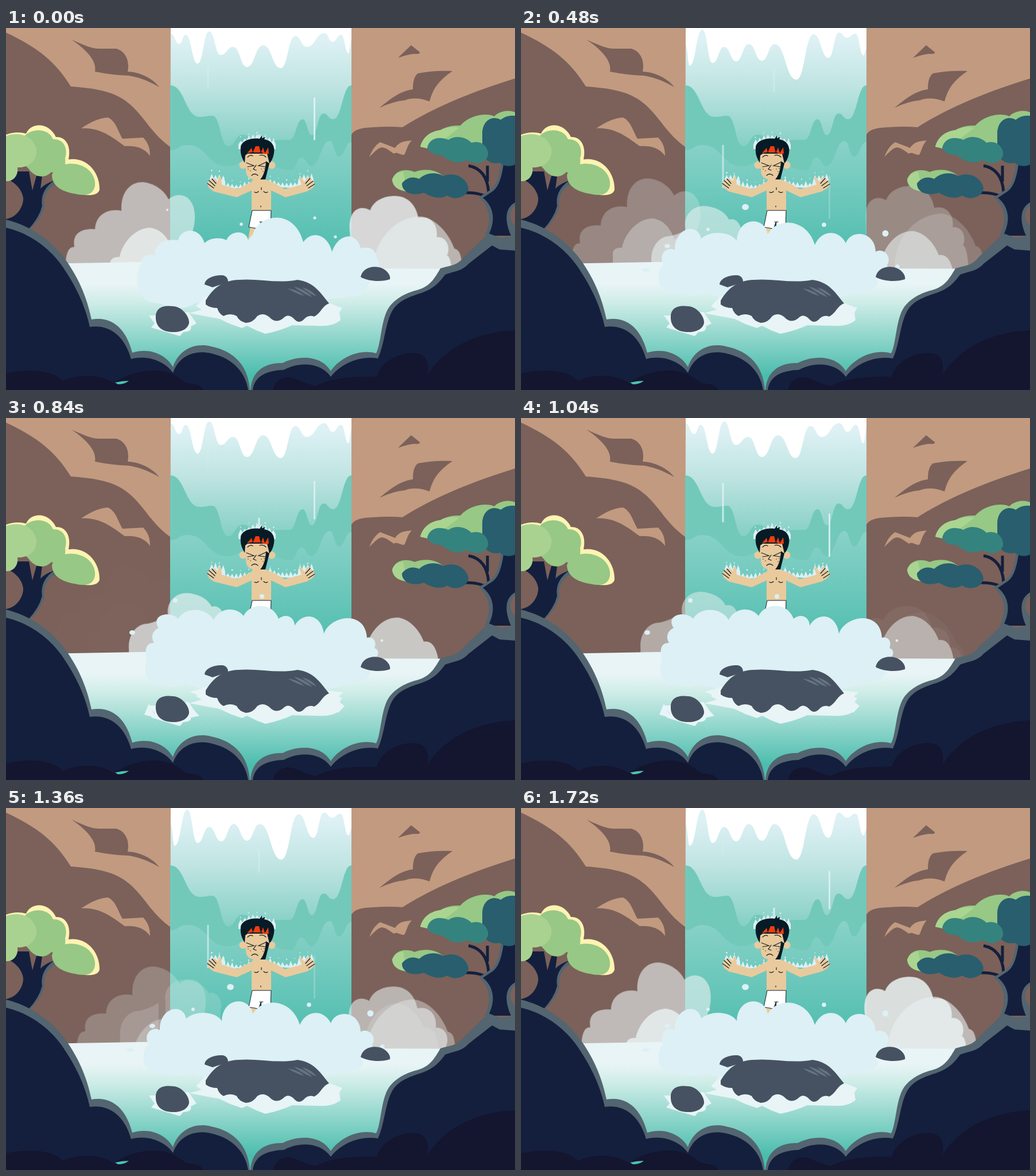
These frames come from a looping animation (887x631 px, 1.76 s). An HTML page:

```html
<!DOCTYPE html>
<html lang="en">
<head>
<meta charset="utf-8">
<title>Waterfall training</title>
<style>
html, body { margin: 0; width: 100%; height: 100%; overflow: hidden; background: #7b6159; }
svg { display: block; width: 100vw; height: 100vh; }
.light { fill: #c19a80 } .dark { fill: #7b6159 }
.navy { fill: #141f3d } .edge { fill: #536570 } .night { fill: #14152f }
.stone { fill: #465261 } .skin { fill: #e9ca9d } .hair { fill: #061b26 }
.foam { fill: #dcf0f5 } .pale { fill: #e8f4f6 }
.line { fill: none; stroke: #10202a; stroke-width: 1.2; stroke-linecap: round }
.branch { fill: none; stroke: #141f3d; stroke-width: 5 }

/* Three foam poses, held without tweening. */
.a, .b, .c { animation: 1760ms step-end infinite }
.a { animation-name: a } .b { animation-name: b } .c { animation-name: c }
@keyframes a { 0% { opacity: 1 } 4.545%, to { opacity: 0 } }
@keyframes b { 0% { opacity: 0 } 4.545% { opacity: 1 } 36.36% { opacity: 0 } 68.18%, to { opacity: 1 } }
@keyframes c { 0% { opacity: 0 } 36.36% { opacity: 1 } 68.18%, to { opacity: 0 } }

/* Every puff swells, drifts by (dx, dy) and thins out, at its own phase. */
.puff { fill: #e8f0f0; animation: drift 1760ms var(--delay) linear infinite }
@keyframes drift {
  0% { opacity: 0; transform: translate(calc(-1 * var(--dx)), calc(-1 * var(--dy))) }
  35% { opacity: var(--peak); transform: none }
  85%, to { opacity: 0; transform: translate(var(--dx), var(--dy)) }
}
.left { --delay: -640ms } .right { --delay: -760ms } .late { --delay: -1700ms }

.streak { fill: #e6f5f7; width: 3px; animation: fall 880ms var(--delay) linear infinite }
@keyframes fall {
  0% { y: 40px; height: 20px; opacity: 0 }
  33% { y: 122.5px; height: 75px; opacity: .85 }
  55% { opacity: .8 }
  to { y: 290px; height: 75px; opacity: 0 }
}
</style>
</head>
<body>
<svg viewBox="0 0 887 631" preserveAspectRatio="none">
<defs>
  <linearGradient id="fall" gradientUnits="userSpaceOnUse" x1="0" y1="20" x2="0" y2="240">
    <stop stop-color="#def1f5"/><stop offset=".37" stop-color="#bfe4e2"/><stop offset="1" stop-color="#72c9bb"/>
  </linearGradient>
  <linearGradient id="deep" gradientUnits="userSpaceOnUse" x1="0" y1="195" x2="0" y2="370">
    <stop stop-color="#8ad2c8"/><stop offset="1" stop-color="#57c0b2"/>
  </linearGradient>
  <linearGradient id="pool" gradientUnits="userSpaceOnUse" x1="0" y1="408" x2="0" y2="605">
    <stop offset=".2" stop-color="#e8f4f6"/><stop offset=".35" stop-color="#d0ede8"/><stop offset="1" stop-color="#4bbdad"/>
  </linearGradient>
</defs>

<!-- cliffs -->
<path class="light" d="M0 0H887V420H0z"/>
<path class="dark" d="M0 8C55 34 86 58 113 102C155 105 182 110 204 124C240 148 248 180 287 208V420H0zM601 188C606 176 620 174 640 173Q670 171 691 173C740 142 800 115 887 88V430H601z"/>
<path class="dark" d="M114 20C140 32 150 36 163 36H192C208 40 216 57 212 76C235 77 255 88 267 103C248 92 232 86 214 83Q184 82 155 76C158 60 146 42 114 20zM683 52L706 30L721 42Q722 46 712 45Q700 46 683 52zM651 139C668 125 688 109 709 107C709 92 712 83 718 79C738 75 757 74 778 75C757 90 745 102 738 128C722 122 708 121 695 126Q674 128 651 139z"/>
<path class="light" d="M131 175C150 162 164 157 178 156C192 163 195 180 203 193L239 191C248 200 251 210 251 223C240 208 225 205 207 206C190 194 165 172 131 175zM633 225C640 208 646 203 652 199L678 209C685 198 695 197 707 196C699 204 698 215 694 221C687 222 682 215 676 219C672 217 664 209 655 208C648 209 642 216 633 225z"/>

<!-- waterfall -->
<path d="M287 0H602V420H286z" fill="url(#fall)"/>
<path fill="#72c9ba" data-wave="286 100 338 155 360 153 387 206 412 186 440 196 494 195 517 159 533 187 553 149 570 159 602 100" data-end="V420H286z"/>
<path fill="url(#deep)" data-wave="286 213 316 204 385 241 430 228 497 248 515 226 532 241 564 197 580 224 602 199" data-end="V420H286z"/>
<g fill="#fff">
  <path class="b" data-wave="287 30 294 66 316 3 334 61 354 33 375 58 397 28 420 57 442 28 480 90 510 11 536 52 554 8 568 17 583 10 597 48 602 36" data-end="V0H287z"/>
  <g class="a"><use href="#drips"/></g>
  <g class="c"><path id="drips" data-wave="287 10 302 28 313 12 334 62 354 6 374 47 396 33 420 68 448 30 479 70 504 14 524 33 555 9 569 24 584 12 597 44 602 20" data-end="V0H287z"/></g>
</g>
<rect class="streak" x="350.5" style="--delay: -96ms"/>
<rect class="streak" x="439.5" style="--delay: -510ms"/>
<rect class="streak" x="536" style="--delay: -285ms"/>

<!-- monk -->
<path class="skin" d="M429 330L422 368H434L446 335z"/>
<g class="foam" id="spray"></g>
<path class="skin" d="M434 260H449L452 264L467 270L486 281L515 273L511 262Q513 257 517 264L520 268L526 259L531 262L536 268L539 273L533 280L524 285L487 295L462 283V320H428V283L402 295L362 285L354 279L350 271L356 264L364 262L369 267L371 260Q375 257 375 264L376 273L403 281L428 268z"/>
<path class="line" d="M351 271L362 279M354 266L364 275M359 263L366 271M538 272L527 279M535 267L524 275M530 262L522 271M433 286Q437 288 440 285M449 285Q452 288 456 286M445 278V282M444 310V312"/>
<path d="M429 318H462L461 352L446 354L444 339L440 350L423 347z" fill="#fff" stroke="#10202a"/>
<path class="line" d="M442 338H448M445 338L443 347"/>
<circle class="skin" cx="413" cy="239" r="6.5"/><circle class="skin" cx="463" cy="239" r="6.5"/>
<path class="skin" d="M416 210H458V238C456 252 449 264 434 264C421 264 418 255 418 247Q415 230 416 210z"/>
<path class="hair" d="M453 232L459 236Q456 248 452 264H443Q452 254 453 232z"/>
<path class="hair" d="M409 208C410 196 428 191 442 193L446 187V192L452 190L450 194C464 196 469 207 467 218Q465 230 459 236L455 219H421L417 222L416 235C411 226 408 220 409 208z"/>
<path d="M420 207Q438 203 457 208L458 219L451 220L446 217L432 216L421 218z" fill="#ee3d10"/>
<path class="hair" d="M418 203H460L451 218L448 208L444 218L441 206L435 206L430 217L428 209L421 217z"/>
<path d="M435 206H441L443 217H431z" fill="#ee3d10"/>
<path class="line" d="M421 225Q426 220 430 223M442 222Q448 220 453 225M419 235L432 240L421 242M453 234L440 240L452 242M436 239L431 246L436 248M428 257Q433 252 439 257"/>
<path d="M421 246h2M425 249h2M424 241h1M444 246h2M449 245h2M447 250h2" stroke="#a56e45" stroke-width="1.5"/>

<!-- drifting mist -->
<path class="puff left" style="--dx: -30px; --dy: -12px; --peak: .64" d="M105 445C102 397 108 381 120 382C116 360 130 349 156 351C157 325 180 314 202 319C200 290 215 269 238 269C260 270 278 285 284 299C300 284 330 290 330 330C330 350 322 370 312 372V445z"/>
<path class="puff left" style="--dx: -40px; --dy: -30px; --peak: .85" d="M183 475V408Q186 399 199 400C204 375 225 351 250 349C270 350 283 365 290 385C310 380 326 395 330 475z"/>
<path class="puff late" style="--dx: -26px; --dy: -8px; --peak: .88" d="M219 445V405C217 380 232 360 252 360Q270 356 286 346V445z"/>
<path class="puff late" style="--dx: -8px; --dy: -10px; --peak: .88" d="M284 445V346C280 325 295 307 316 307C340 308 355 320 360 331C373 325 386 345 380 360V445z"/>
<path class="puff late" style="--dx: 0px; --dy: -12px; --peak: .88" d="M625 455V420C626 385 650 350 682 350C705 352 722 375 728 392C745 390 754 405 757 455z"/>
<path class="puff right" style="--dx: 20px; --dy: -9px; --peak: .7" d="M637 465V422C637 370 677 330 719 330C747 333 769 361 778 386C790 389 793 401 792 465z"/>
<path class="puff right" style="--dx: 3px; --dy: -32px; --peak: 1" d="M599 465V365C596 344 600 320 620 319Q628 319 634 323C640 306 658 298 677 298C700 298 714 314 718 336C740 331 753 349 750 370C766 368 775 386 768 402Q777 403 779 465z"/>

<!-- pool -->
<path d="M60 411L286 407L600 419L887 420V631H60z" fill="url(#pool)"/>
<path class="pale" d="M598 437L622 428H672L668 443L625 444z"/>
<g class="foam">
  <g class="a">
    <path d="M232 460C228 435 229 418 237 411C232 400 246 392 260 397C258 380 272 366 300 370C304 350 336 344 346 375C355 364 378 365 384 370C391 353 417 351 422 369L430 360C440 324 502 313 518 373C535 350 562 362 568 390C580 356 612 355 618 384Q643 378 646 400C654 410 650 426 637 431Q634 455 615 466L545 475H347L328 480C312 494 280 488 270 480Q244 482 232 460z"/>
    <circle cx="281" cy="317" r="2"/><circle cx="410" cy="342" r="2.8"/><circle cx="538" cy="331" r="2.6"/><circle cx="574" cy="364" r="2.6"/>
  </g>
  <g class="b">
    <path d="M242 449C237 432 241 415 249 413C238 396 253 379 268 387C267 348 308 338 314 367C330 352 365 354 376 371C378 328 425 328 430 359C448 328 499 333 512 378C524 351 554 351 566 375C575 350 617 354 618 390C633 382 647 400 638 413C643 426 632 438 618 437Q631 449 604 457L545 472H350L326 461C310 469 291 468 280 462Q257 466 242 449z"/>
    <ellipse cx="391" cy="312" rx="6" ry="5.3"/><circle cx="326" cy="351" r="3"/><ellipse cx="255" cy="380" rx="5" ry="3.7"/><circle cx="528" cy="343" r="3.8"/><circle cx="635" cy="358" r="5.5"/><circle cx="656" cy="416" r="3.8"/><ellipse cx="217" cy="422" rx="7" ry="3"/>
  </g>
  <g class="c">
    <path d="M247 455C240 440 244 425 246 420C240 402 246 391 258 392C251 380 257 370 266 366C251 343 286 335 300 350C312 328 350 330 362 352C373 329 402 329 414 345C425 322 464 320 475 350C488 339 503 347 503 362C517 337 550 341 554 376C565 344 626 334 629 383C643 380 646 394 642 401C653 404 650 421 635 420Q641 444 627 455L590 466L550 474H350L310 464C295 473 280 468 272 464Q255 470 247 455z"/>
    <circle cx="295" cy="318" r="4"/><ellipse cx="220" cy="374" rx="5" ry="4"/><circle cx="446" cy="311" r="4"/><circle cx="655" cy="388" r="2.3"/>
  </g>
</g>
<g class="pale">
  <path d="M249 501L266 501L318 495L332 515L322 520Q325 529 309 530L303 537L279 530L253 522L259 515zM347 468L331 485L341 491L319 497L372 507L391 516L411 523L420 519L436 527L452 533Q477 528 499 518L541 519Q570 521 583 509L581 496L586 488L565 480z"/>
  <path class="c" d="M249 498L241 517L262 523zM318 500L337 519L315 524zM346 470L320 477L350 490zM560 475L588 478L575 490L590 502L579 514z"/>
</g>
<path class="stone" d="M261 502C262 486 276 483 291 485C308 486 320 504 319 514C317 526 302 531 289 530C271 529 260 520 261 502zM618 434C621 420 635 414 650 417C663 420 671 431 669 438C655 443 631 442 618 434zM346 447C347 435 365 430 378 431Q387 433 387 443L360 452z"/>
<path class="stone" d="M348 475C360 455 376 440 405 439C440 436 472 446 508 439C539 443 550 465 563 480C551 484 549 497 537 503Q527 499 519 508Q510 517 501 506Q491 497 483 506Q470 516 459 504Q448 495 438 502Q430 514 418 514Q406 511 402 502Q391 496 379 502Q371 498 368 488Q356 488 348 482z"/>
<path d="M491 454Q510 457 520 467Q507 464 491 454zM502 451Q523 456 534 469Q518 464 502 451zM516 452Q534 457 541 468Q528 463 516 452z" fill="#667480"/>

<!-- left tree -->
<path class="edge" d="M56 280Q68 270 86 266L90 270C69 280 65 298 67 311Q61 334 40 352L25 344z"/>
<path class="navy" d="M0 333C20 330 31 310 30 296Q26 274 0 262V250H40L46 283L53 258H63L60 280Q69 271 84 266C64 280 61 296 63 310Q58 331 38 352L0 344z"/>
<path d="M0 186Q18 179 35 184C45 163 75 165 87 190C105 189 114 207 109 229C141 224 164 252 163 282Q160 293 137 291L100 250L0 220z" fill="#fff3b2"/>
<path d="M80 257C83 243 101 234 121 237C145 241 157 259 155 275C152 292 137 293 120 289C96 285 81 275 80 257zM32 189C44 174 74 174 82 194C103 193 108 213 103 227C106 244 93 257 79 251C66 265 48 258 40 246L20 225z" fill="#97c885"/>
<path d="M0 188C24 180 47 188 53 211C55 232 39 244 20 243C22 259 11 268 0 267z" fill="#a9d291"/>

<!-- right tree -->
<g id="branches" class="branch"><path d="M806 240Q838 246 841 286M839 240V268M798 287Q830 286 846 300"/></g>
<path class="edge" d="M834 362C848 335 842 310 824 295L846 281C856 272 860 256 862 238H887V362z"/>
<path class="navy" d="M840 362C855 335 849 310 831 296L849 284C860 275 864 257 867 238H887V304C870 314 868 334 880 362z"/>
<path class="dark" d="M887 309C876 320 876 334 887 345z"/>
<path d="M790 172C808 150 840 148 851 154C861 143 880 143 887 147V190H815zM722 207C726 191 739 180 757 178C775 166 809 168 829 181L841 210L734 210zM673 264C678 248 696 244 712 251C737 242 758 251 766 263L703 286Q674 282 673 264z" fill="#97c885"/>
<path d="M722 207C726 191 739 180 757 178C770 172 780 172 790 174L741 211zM673 264Q678 252 692 250L699 285Q674 282 673 264z" fill="#a9d591"/>
<path d="M830 183C831 161 847 152 862 160Q873 151 887 153V238C878 243 865 240 861 235Q838 240 830 216zM690 271C696 262 708 257 720 263C734 250 752 252 762 258C785 249 804 264 806 280C803 296 781 301 769 292C752 301 735 291 728 287C707 294 690 286 690 271z" fill="#285e6e"/>
<path d="M734 209C737 194 751 187 771 195C785 185 804 192 811 200C830 194 842 210 840 222C835 237 816 239 804 230C786 240 768 230 760 222Q739 221 734 209z" fill="#35837e"/>

<!-- foreground rocks -->
<path class="edge" d="M0 334C45 345 83 373 108 410C133 447 143 480 149 508C189 501 211 530 220 566C251 556 280 570 291 591C301 560 330 548 357 555C398 563 422 589 425 631H0zM887 362L862 366L841 358L797 400C786 415 772 414 757 419C744 442 735 453 712 458C687 466 677 475 668 486C653 507 654 551 645 567C615 558 580 576 566 598C550 571 512 569 482 584C450 583 428 599 426 631H887z"/>
<path class="navy" d="M0 348C42 358 77 384 100 418C125 455 139 488 146 521C184 516 208 541 218 577C249 569 278 582 291 601C302 570 330 561 357 567C398 576 418 603 422 631H0zM887 388L860 386L847 379L806 411C795 424 780 424 765 430C752 449 738 458 717 464C694 472 684 478 675 490C661 510 660 552 648 576C617 570 582 586 566 608C549 583 512 581 484 596C452 597 433 608 430 631H887z"/>
<path class="night" d="M0 602C37 594 81 595 99 615C130 601 168 604 188 619C212 600 256 592 280 600C306 607 306 619 323 620Q339 621 344 631H0zM465 631C470 610 490 604 508 613Q525 621 540 624C567 609 610 607 646 608C653 581 687 563 716 567C735 570 738 588 734 605C765 555 825 529 887 527V631z"/>
<path d="M190 618Q202 615 214 615Q207 621 195 621z" fill="#4bc4b4"/>
</svg>
<script>
// Rolling line whose listed points are its crests and troughs.
for (const path of document.querySelectorAll('[data-wave]')) {
  const [x0, y0, ...rest] = path.dataset.wave.split(' ').map(Number);
  let d = `M${x0} ${y0}`, x = x0, y = y0;
  for (let i = 0; i < rest.length; i += 2) {
    const [nextX, nextY] = [rest[i], rest[i + 1]], half = (x + nextX) / 2;
    d += `C${half} ${y} ${half} ${nextY} ${nextX} ${nextY}`;
    [x, y] = [nextX, nextY];
  }
  path.setAttribute('d', d + path.dataset.end);
}

let seed = 7;
const random = () => (seed = seed * 16807 % 2147483647) / 2147483647;

// Jagged splash with loose drops along an arc that bulges upwards.
function splash(x1, y1, x2, y2, bulge, height) {
  const teeth = Math.round(Math.abs(x2 - x1) / 7);
  let d = `M${x1} ${y1 + 8}`, drops = '';
  for (let i = 0; i <= teeth * 2; i++) {
    const k = i / teeth / 2;
    const x = x1 + (x2 - x1) * k;
    const y = y1 + (y2 - y1) * k - bulge * Math.sin(Math.PI * k);
    const tip = i % 2 ? height * (.6 + .6 * random()) : 0;
    d += `L${x} ${y - tip}`;
    if (i % 4 === 1) drops += `<circle cx="${x}" cy="${y - height - 5 * random()}" r="${.7 + .7 * random()}"/>`;
  }
  return `<path d="${d}L${x2} ${y2 + 8}z"/>${drops}`;
}
document.getElementById('spray').innerHTML = ['a', 'b', 'c'].map(pose => `<g class="${pose}">
  ${splash(405, 203, 470, 203, 11, 7)}
  ${splash(355, 263, 382, 268, 2, 10)}${splash(376, 273, 434, 270, -7, 8)}
  ${splash(457, 268, 514, 272, -6, 8)}${splash(509, 266, 536, 264, 2, 9)}</g>`).join('');
</script>
</body>
</html>
```
